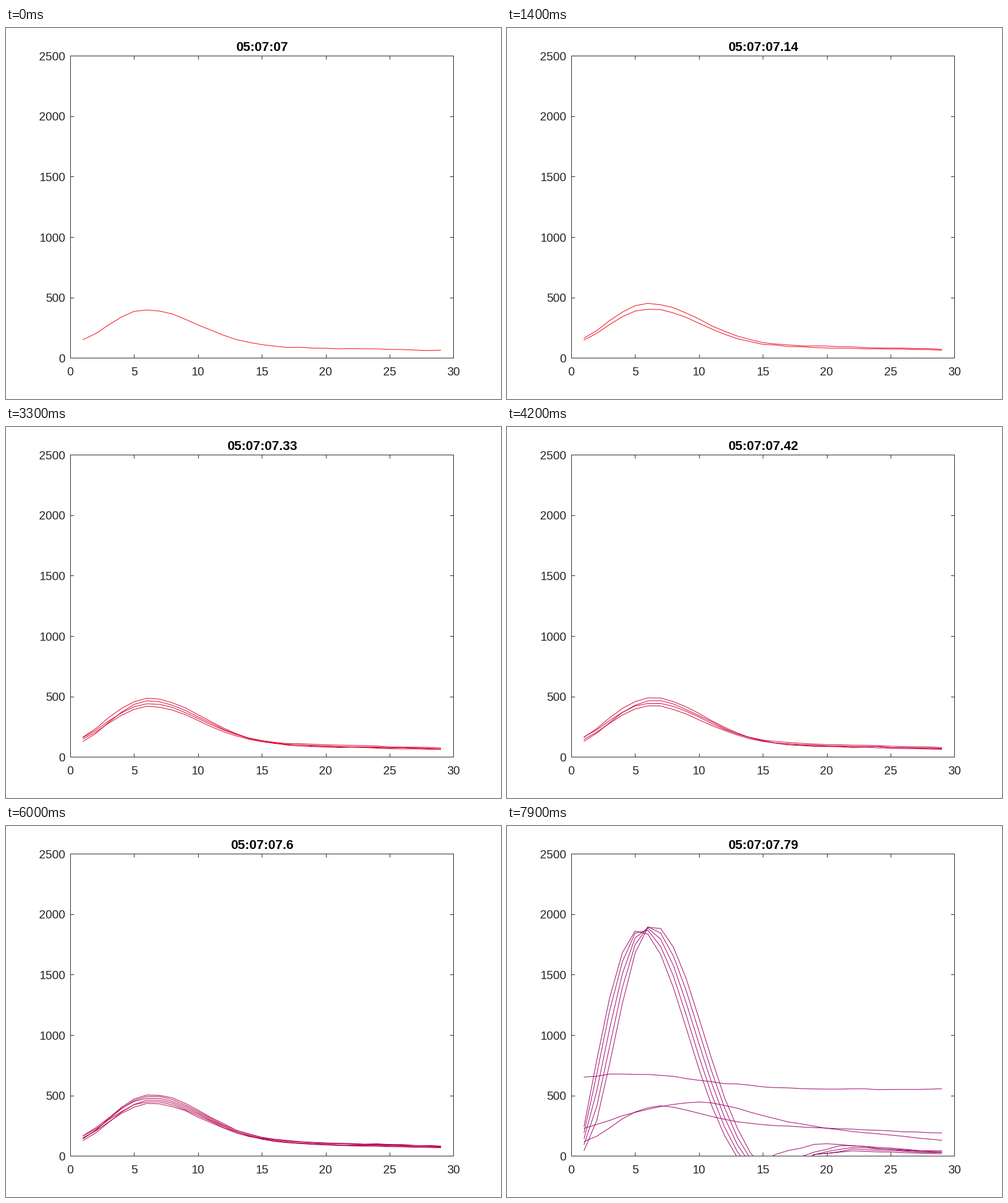
Write a matplotlib script that moves like this. It is 840 px wide and 630 px high and loops after 8000 ms.

```python
import numpy as np
import matplotlib.pyplot as plt
from matplotlib.animation import FuncAnimation

plt.rcParams["font.family"] = "Liberation Sans"

W, H, DPI = 840, 630, 100
PX = 72 / DPI
FRAMES, STEP = 80, 100
BURST = 68  # first step of the strong pulses
LEFT, RIGHT, TOP, BOTTOM = 109.1, 759.3, 47.3, 560.3
X = np.arange(1, 30)


def lerp(a, b, t):
    return a + (b - a) * t


def tail(mid, end):
    """Straight line through mid at x=20 and end at x=29."""
    return lerp(end, mid, (29 - X) / 9)


def pulse(start, pos, top, at, ref, base):
    """Sine rise from start to top, then a bell fall through (at, ref) onto base."""
    k = max(1.05, 1.75 - start / 320)
    u = np.clip((X - 1) / (pos - 1), 0, 1)
    rise = lerp(start, top, np.sin(u * np.pi / 2) ** k)
    height = top - np.interp(pos, X, base)
    ratio = np.clip((ref - np.interp(at, X, base)) / height, 0.02, 0.98)
    fall = base + height * ratio ** (((X - pos) / (at - pos)) ** 2)
    return np.where(X <= pos, rise, fall)


def calm(i, j, n):
    """Ordinary pulse j of n, slowly growing with time."""
    top = 400 + 0.6 * i + 90 * j / n
    mid = 80 + 0.3 * i + 10 * np.sin(1.7 * j)
    return pulse(150 + 20 * np.sin(2.4 * j), 6.1 + 0.006 * i, top,
                 10, top * (0.69 + 0.0009 * i), tail(mid, 0.77 * mid))


def spike(g, j):
    """Tall pulse that undershoots zero and returns as a low hump."""
    top = lerp(300, 1870, g) + 10 * j
    hump = (105 - 16 * j) * (2 * g - 1)
    dip = lerp(150, -300, g)
    knots = np.array([16, 19, 22, 25, 29]) - 2.7 * 0.3 ** j
    base = np.interp(X, knots, [dip, min(0, hump), hump, 0.8 * hump, 0.4 * hump])
    return pulse(lerp(407, 245, g) - 50 * j, lerp(4.1, 5.3, g) + 0.27 * j, top,
                 10, top * (lerp(0.26, 0.385, g) + 0.053 * j), base)


def swell(g, j):
    """Broad, slowly fading pulse."""
    pos = lerp(7.8, 6.9, g) + 3.5 * j
    top = lerp(863, 415, g) + 30 * j
    base = tail(lerp(172, 230, g) - 8 * j, lerp(68, 188, g) - 58 * j)
    return pulse(117 + 112 * j, pos, top, pos + 3.3, 0.84 * top, base)


def curves(i):
    if i < BURST:
        n = 1 + i // 11
        out = [calm(i, j, n) for j in range(n)]
    else:
        g = (i - 64) / 15
        spikes = 1 + max(0, round((i - 70) * 4 / 9))
        out = [spike(g, j) for j in range(spikes)]
        out += [swell(g, j) for j in range(1 + (g > 0.5))]
        if g > 0.5:
            out.append(pulse(647, 4.2, 680, 10, 628, tail(552, 553)))
    rng = np.random.default_rng(500 + i)
    return [y + rng.normal(0, 2, X.size) for y in out]


def stamp(i):
    return "05:07:07" + (f".{i:02d}".rstrip("0") if i else "")


fig = plt.figure(figsize=(W / 100, H / 100), dpi=DPI, facecolor="white")
ax = fig.add_axes([LEFT / W, 1 - BOTTOM / H, (RIGHT - LEFT) / W, (BOTTOM - TOP) / H])
ax.set(xlim=(0, 30), ylim=(0, 2500),
       xticks=range(0, 31, 5), yticks=range(0, 2501, 500))
ink = "#262626"
ax.tick_params(direction="in", top=True, right=True, length=6 * PX, width=PX,
               color=ink, labelcolor=ink, labelsize=20 * PX)
ax.tick_params(axis="x", pad=14.5 * PX)
ax.tick_params(axis="y", pad=8.5 * PX)
for side in ax.spines.values():
    side.set(linewidth=PX, color=ink)

title = fig.text(434.7 / W, 1 - 39 / H, "", ha="center", va="baseline",
                 weight="bold", size=22 * PX, color="black")
lines = [ax.plot([], [], lw=PX)[0] for _ in range(8)]


def draw(i):
    title.set_text(stamp(i))
    mix = i / 200
    ys = curves(i)
    for n, line in enumerate(lines):
        line.set_color((1 - mix, 0, mix))
        if n < len(ys):
            line.set_data(X, ys[n])
        else:
            line.set_data([], [])
    return [title, *lines]


anim = FuncAnimation(fig, draw, frames=FRAMES, interval=STEP,
                     init_func=lambda: draw(0), repeat=True, blit=False)
plt.show()
```
